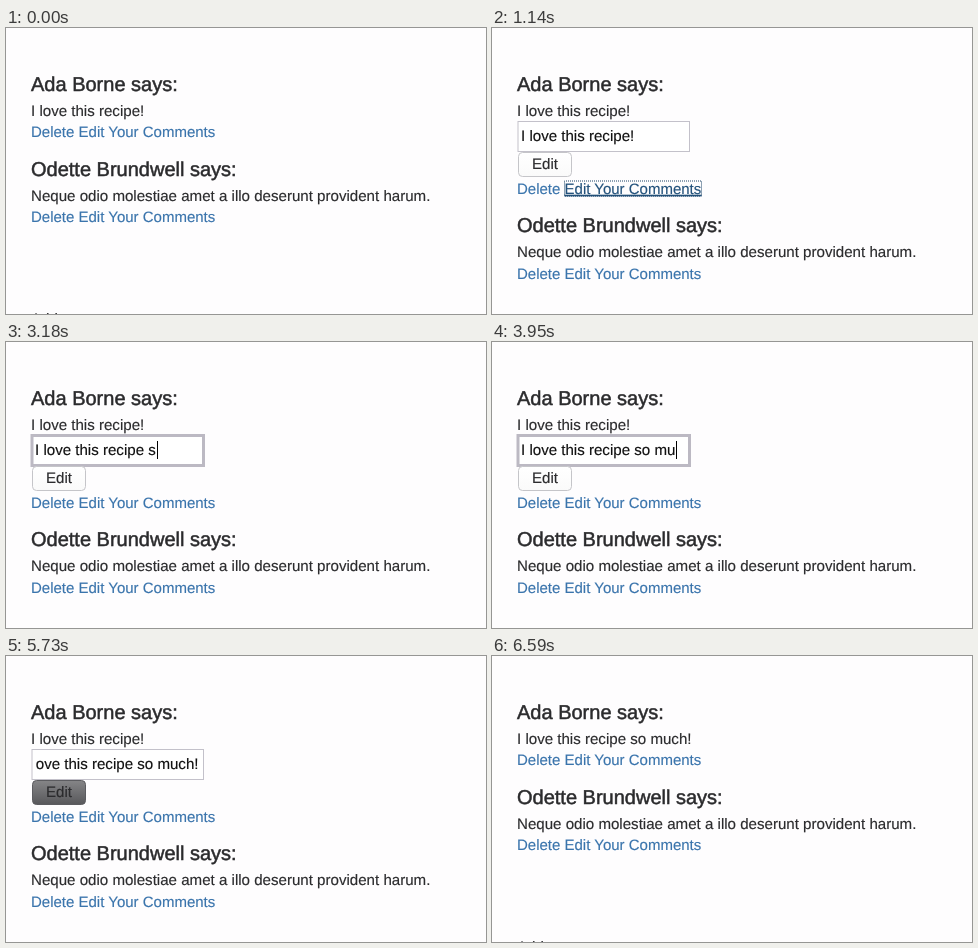
Recreate the animation shown at these times as an HTML page. Size 480x286 px, loop 6630 ms.

```html
<!DOCTYPE html>
<html lang="en">
<head>
<meta charset="utf-8">
<title>Comment editing</title>
<style>
  html, body { margin: 0; width: 100%; height: 100%; overflow: hidden; background: #fefdfe; }
  svg { display: block; width: 480px; height: 286px; }
  text {
    font: 15.1px "Liberation Sans", Arial, sans-serif;
    fill: #2b2b2d;
    stroke: #2b2b2d;
    stroke-width: .15px;
    text-rendering: geometricPrecision;
    white-space: pre;
  }
  .name { font-size: 20px; stroke-width: .5px; }
  .links { font-size: 15px; fill: #3a74ac; stroke: #3a74ac; }
  .hover { fill: #23527c; stroke: #23527c; text-decoration: underline; }
  .outline { fill: none; stroke: #1d4468; stroke-dasharray: 1 1; stroke-dashoffset: .5; }
  .field { fill: #fff; stroke: #c3c1ca; }
  .focused .field { stroke: #bcb9c3; stroke-width: 3px; }
  .value { fill: #111; stroke: #111; }
  .button { fill: url(#up); stroke: #c5c5c9; }
  .pressed .button { fill: url(#down); stroke: #5c5c60; }
  .label { text-anchor: middle; }
</style>
</head>
<body>
<svg viewBox="0 0 480 286">
  <defs>
    <linearGradient id="up" x2="0" y2="1">
      <stop stop-color="#fff"/><stop offset="1" stop-color="#fafafa"/>
    </linearGradient>
    <linearGradient id="down" x2="0" y2="1">
      <stop stop-color="#858587"/><stop offset="1" stop-color="#58585b"/>
    </linearGradient>
    <clipPath id="inside"><rect x="29" y="96" width="166" height="26"/></clipPath>
  </defs>

  <text class="name" x="25" y="63">Ada Borne says:</text>
  <text id="comment" x="25" y="88.3"></text>

  <g id="form">
    <rect class="field" x="26" y="93.5" width="171.5" height="30"/>
    <g clip-path="url(#inside)">
      <text id="value" class="value" y="113.3"></text>
      <rect id="caret" y="99" width="1" height="18"/>
    </g>
    <rect class="button" x="26.5" y="124.5" width="53" height="24" rx="4"/>
    <text class="label" x="53" y="141">Edit</text>
  </g>

  <g id="below">
    <text class="links" x="25" y="109.3">Delete <tspan id="edit">Edit Your Comments</tspan></text>
    <rect id="outline" class="outline" x="72.5" y="96.5" width="137" height="15"/>
    <text class="name" x="25" y="147.5">Odette Brundwell says:</text>
    <text x="25" y="172.8">Neque odio molestiae amet a illo deserunt provident harum.</text>
    <text class="links" x="25" y="194">Delete Edit Your Comments</text>
    <text x="25" y="296.3">Add</text>
  </g>
</svg>
<script>
  const LOOP = 6630;
  const HOVER = 600, CLICK = 730, OPEN = 1060, FOCUS = 1500, PRESS = 5600, SUBMIT = 5960;
  const FORM_HEIGHT = 56.5, TEXT_LEFT = 29, TEXT_RIGHT = 192.5;
  const before = "I love this recipe!";
  const after = "I love this recipe so much!";
  const stem = before.slice(0, -1);
  const erase = 2450;
  const keys = [2950, 3100, 3290, 3480, 3660, 3830, 3990, 4230, 4460];

  const [comment, form, value, caret, below, edit, outline] =
    ["comment", "form", "value", "caret", "below", "edit", "outline"]
      .map(id => document.getElementById(id));

  const show = (el, on) => el.setAttribute("visibility", on ? "inherit" : "hidden");

  function typed(t) {
    if (t < erase) return before;
    return after.slice(0, stem.length + keys.filter(k => k <= t).length);
  }

  function render(t) {
    const open = t >= OPEN && t < SUBMIT;
    const focused = t >= FOCUS && t < PRESS;
    const linkFocused = t >= CLICK && t < FOCUS;

    comment.textContent = t < SUBMIT ? before : after;
    below.setAttribute("transform", `translate(0 ${open ? FORM_HEIGHT : 0})`);
    edit.setAttribute("class", t >= HOVER && t < FOCUS ? "hover" : "");
    show(outline, linkFocused);

    show(form, open);
    form.setAttribute("class", focused ? "focused" : t >= PRESS ? "pressed" : "");
    value.textContent = typed(t);
    const width = value.getComputedTextLength();
    const left = Math.min(TEXT_LEFT, TEXT_RIGHT - width);
    value.setAttribute("x", left);

    // The caret restarts its blink at every key
    const lastKey = Math.max(...[FOCUS, erase, ...keys].filter(k => k <= t), 0);
    caret.setAttribute("x", Math.round(left + width + .8));
    show(caret, open && focused && (t - lastKey) % 1000 < 500);
  }

  const start = performance.now();
  function tick() {
    render((performance.now() - start) % LOOP);
    requestAnimationFrame(tick);
  }
  tick();
</script>
</body>
</html>
```
